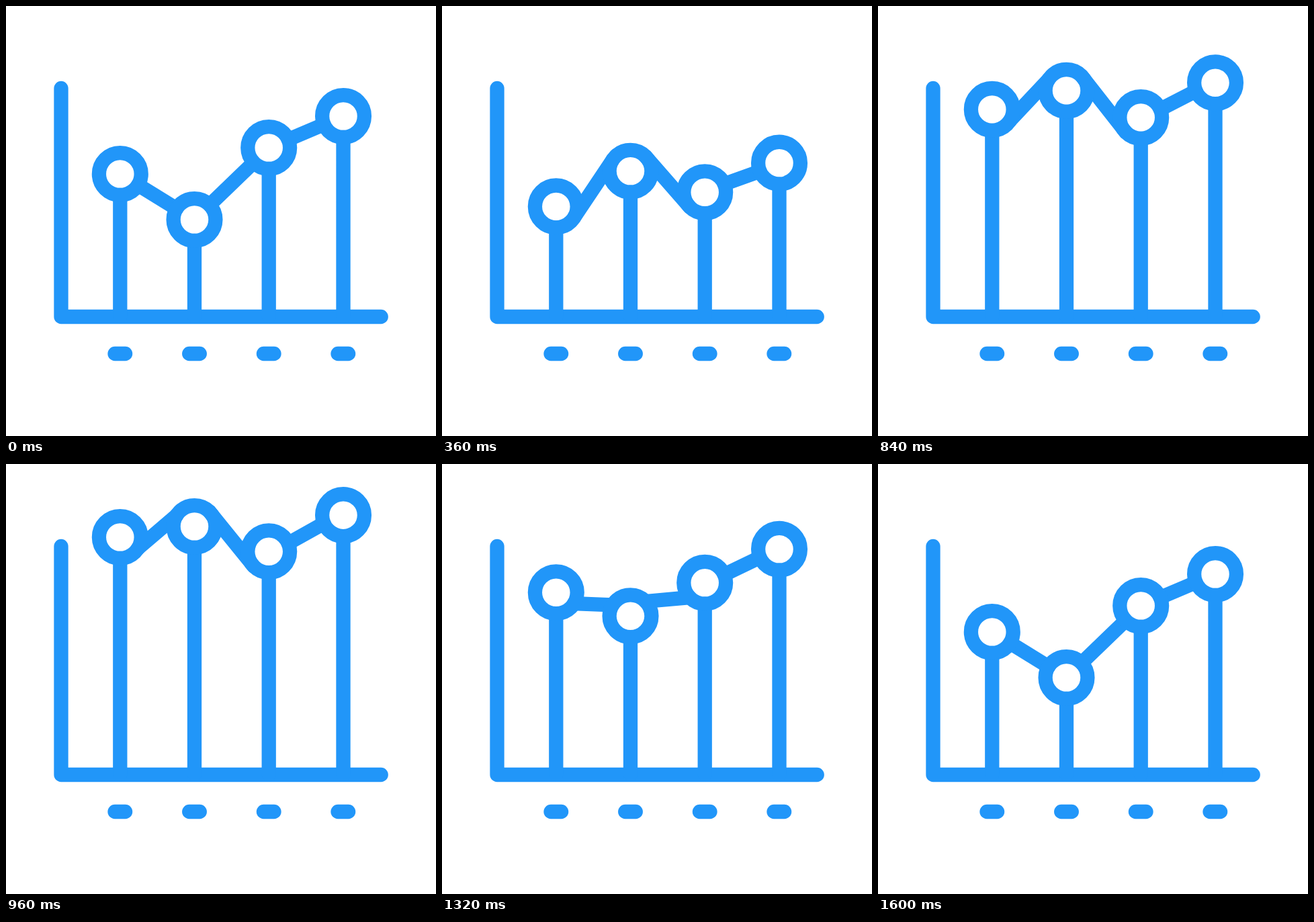
An HTML page for the animation above (1640 ms loop, 640 by 640 pixels).

```html
<!DOCTYPE html>
<html lang="en">
<head>
<meta charset="utf-8">
<title>Line chart</title>
<style>
  html, body { margin: 0; width: 100%; height: 100%; overflow: hidden; background: #fff; }
  svg { display: block; width: 100vw; height: 100vh; }
  path, circle { fill: none; stroke: #2196f9; stroke-width: 21.3; stroke-linecap: round; stroke-linejoin: round; }
</style>
</head>
<body>
<svg viewBox="0 0 640 640">
  <path d="M82 122.5V462.5H558.2"/>
  <path d="M162 517.5h15.6M272.7 517.5h15.6M383.4 517.5h15.6M494 517.5h15.6"/>
  <path id="lines"/>
  <g id="nodes"></g>
</svg>
<script>
  const LOOP = 1640, STEP = 40, BASE = 462, R = 31.4;
  const xs = [169.8, 280.5, 391.2, 502];
  const rest = [250, 318, 211, 164];
  const low = [304.7, 236.5, 285.8, 242.7];
  const high = [103, 88.6, 125.5, 71];

  // Each move: start, end, poses, and the x handles of its ease curve.
  const moves = [
    { t0: 0, t1: 510, from: rest, to: low, h: [0.43, 0.43] },
    { t0: 510, t1: 1020, from: low, to: high, h: [0.335, 0.61] },
    { t0: 1020, t1: 1600, from: high, to: rest, h: [0.653, 0.303] }
  ];

  // Cubic ease with flat ends, solved by bisection.
  function ease(u, [a, b]) {
    if (u <= 0) return 0;
    if (u >= 1) return 1;
    let lo = 0, hi = 1, s;
    for (let i = 0; i < 24; i++) {
      s = (lo + hi) / 2;
      const r = 1 - s;
      if (3 * r * r * s * a + 3 * r * s * s * b + s * s * s < u) lo = s; else hi = s;
    }
    return s * s * (3 - 2 * s);
  }

  function pose(t) {
    const m = moves.find(m => t < m.t1) || moves[2];
    const p = ease((t - m.t0) / (m.t1 - m.t0), m.h);
    return m.from.map((y, i) => y + (m.to[i] - y) * p);
  }

  // Links stay pinned to the same spots on the rings, set by the rest pose.
  const links = [0, 1, 2].map(i => {
    const dx = xs[i + 1] - xs[i], dy = rest[i + 1] - rest[i];
    const k = R / Math.hypot(dx, dy);
    return [dx * k, dy * k];
  });

  const lines = document.getElementById("lines");
  const nodes = xs.map(x => {
    const c = document.createElementNS("http://www.w3.org/2000/svg", "circle");
    c.setAttribute("cx", x);
    c.setAttribute("r", R);
    return document.getElementById("nodes").appendChild(c);
  });

  function draw(t) {
    const ys = pose(t);
    let d = "";
    ys.forEach((y, i) => {
      nodes[i].setAttribute("cy", y);
      d += `M${xs[i]} ${y + R}V${BASE}`;
    });
    links.forEach(([ox, oy], i) => {
      d += `M${xs[i] + ox} ${ys[i] + oy}L${xs[i + 1] - ox} ${ys[i + 1] - oy}`;
    });
    lines.setAttribute("d", d);
  }

  const start = performance.now();
  function tick() {
    const t = (performance.now() - start) % LOOP;
    draw(Math.floor(t / STEP) * STEP);
    requestAnimationFrame(tick);
  }
  tick();
</script>
</body>
</html>
```
